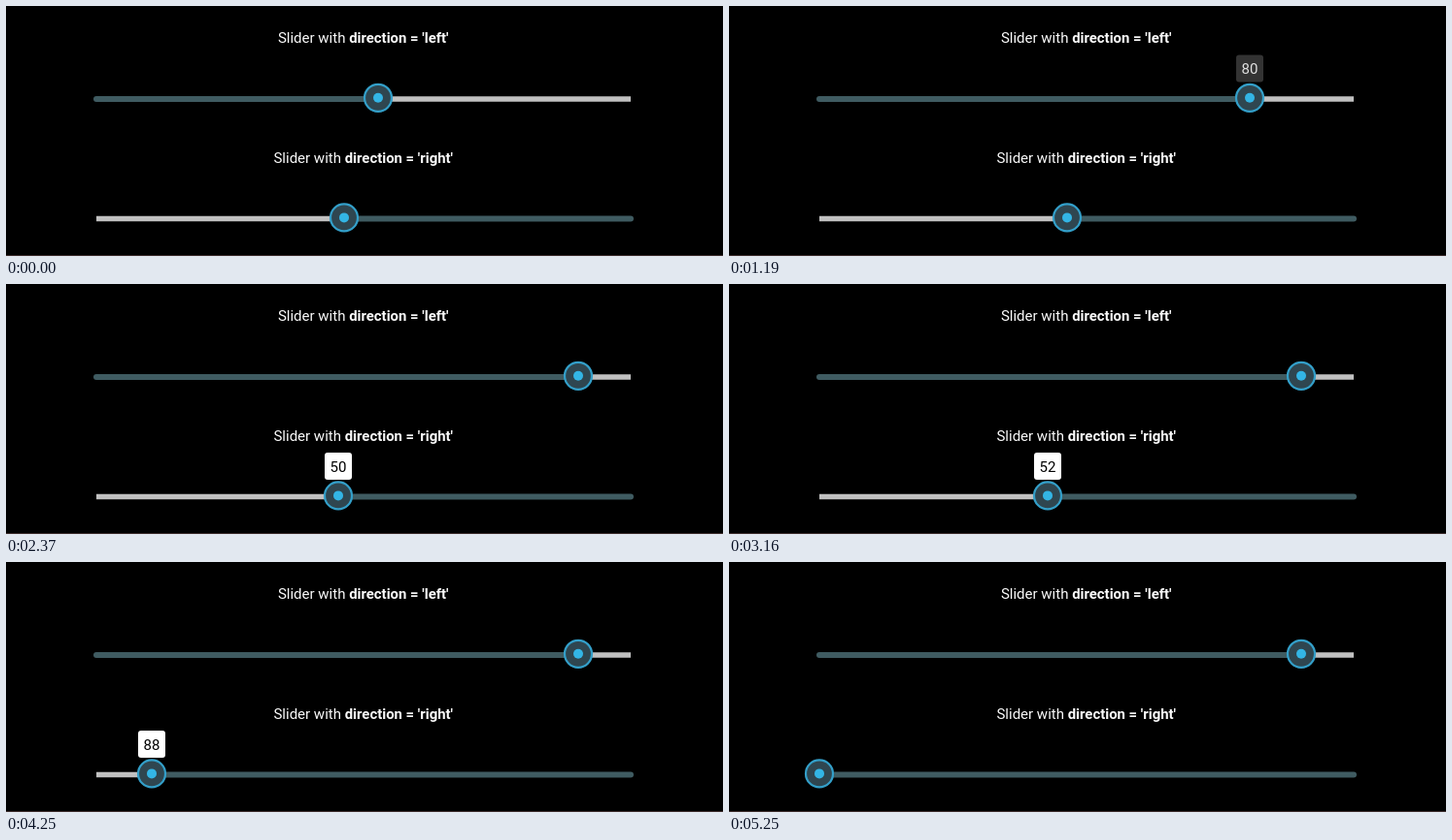
Write an HTML page that moves like this. It is 738 by 258 pixels and loops after 5570 ms.

```html
<!DOCTYPE html>
<html lang="en">
<head>
<meta charset="utf-8">
<title>Sliders</title>
<style>
  html, body { margin: 0; height: 100%; overflow: hidden; background: #000; }
  svg { display: block; }
  text { font: 15px Roboto, sans-serif; fill: #fafafa; text-anchor: middle; }
  .bold { font-weight: 700; font-size: 14.9px; }
  .rest { stroke: #c0c0c0; stroke-width: 5.5; }
  .fill { stroke: #3f5b61; stroke-width: 6; stroke-linecap: round; }
  .ring { fill: #2f4650; stroke: #339fc9; stroke-width: 2.2; }
  .dot { fill: #33b5e5; }
</style>
</head>
<body>
<svg id="stage" width="738" height="258" viewBox="0 0 738 258">
  <rect y="257" width="738" height="1" fill="#3c2c2c"/>
</svg>
<script>
const LOOP = 5570, TICK = 78.7;
const LEFT = 93, RIGHT = 643;
const stage = document.getElementById('stage');

// Progress of a drag from time a to b: p shapes the start, q the stop.
function drag(t, a, b, p, q) {
  const u = Math.min(Math.max((t - a) / (b - a), 0), 1);
  return 1 - (1 - u ** p) ** q;
}

const sliders = [
  {
    dir: 'left', y: 0, tipFill: '#333', tipText: '#e0e0e0',
    fillX: LEFT, restX: RIGHT, startX: 383, show: 170, hide: 2130,
    x: t => 377 + 212 * drag(t, 252, 1800, 1.85, 2.83),
    value: x => (x - LEFT) / 5.5
  },
  {
    dir: 'right', y: 123.6, tipFill: '#fff', tipText: '#000',
    fillX: RIGHT, restX: LEFT, startX: 348, show: 2370, hide: 5250,
    x: t => 342 - 130 * drag(t, 3005, 3610, 1.56, 1) - 119 * drag(t, 3935, 4650, 1.6, 2.35),
    value: x => 100 - (x - LEFT) / 4.98
  }
];

function build(s) {
  const g = document.createElementNS('http://www.w3.org/2000/svg', 'g');
  g.innerHTML = `
    <text x="367.7" y="${Math.ceil(38 + s.y)}">Slider with <tspan class="bold">direction = '${s.dir}'</tspan></text>
    <g transform="translate(0 ${s.y})">
      <line class="rest" x1="${s.restX}" y1="96" y2="96"/>
      <line class="fill" x1="${s.fillX}" y1="96" y2="96"/>
      <g class="knob">
        <circle class="ring" cy="94.8" r="14"/>
        <circle class="dot" cy="94.8" r="5"/>
        <g class="tip">
          <rect x="-14" y="50.5" width="28" height="28" rx="3" fill="${s.tipFill}"/>
          <text y="70" style="fill:${s.tipText}"></text>
        </g>
      </g>
    </g>`;
  stage.append(g);
  s.lines = g.querySelectorAll('line');
  s.knob = g.querySelector('.knob');
  s.tip = g.querySelector('.tip');
  s.label = s.tip.querySelector('text');
}

function draw(s, t) {
  const tickTime = Math.floor(t / TICK) * TICK;
  const x = t < s.show ? s.startX : Math.round(s.x(tickTime));
  s.lines.forEach(line => line.setAttribute('x2', x));
  s.knob.setAttribute('transform', `translate(${x})`);
  s.tip.style.display = t >= s.show && t < s.hide ? '' : 'none';
  s.label.textContent = Math.floor(s.value(x));
}

sliders.forEach(build);
const start = performance.now();
function frame() {
  const t = (performance.now() - start) % LOOP;
  sliders.forEach(s => draw(s, t));
  requestAnimationFrame(frame);
}
frame();
</script>
</body>
</html>
```
